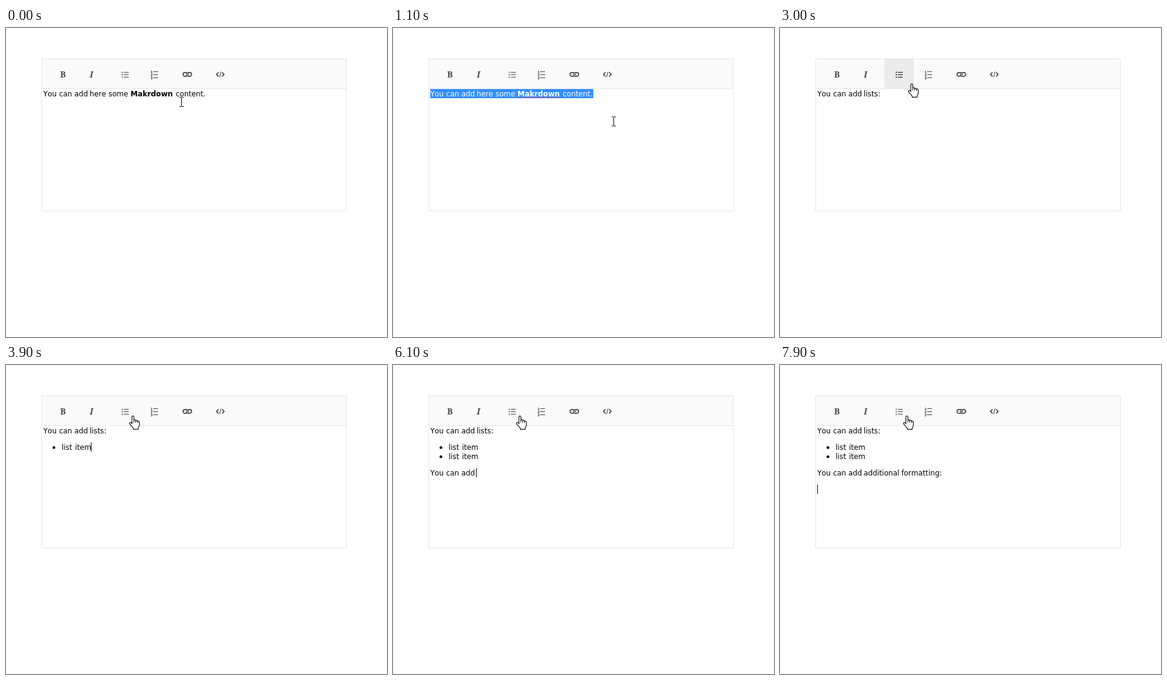
An HTML page with a canvas for the animation above (8 s loop, 624 by 506 pixels).

```html
<!DOCTYPE html>
<html lang="en">
<head>
<meta charset="utf-8">
<title>Rich text editor</title>
<style>
html, body { margin: 0; width: 100%; height: 100%; overflow: hidden; background: #fff; }
canvas { display: block; }
</style>
</head>
<body>
<canvas id="stage" width="624" height="506"></canvas>
<script>
const LOOP = 8000, TICK = 100, LINE = 15;
const c = document.getElementById('stage').getContext('2d');
const SANS = '11.8px "DejaVu Sans", Verdana, sans-serif';
const SERIF = '"Noto Serif", serif';

// y of each line, and where each of its words begins
const rows = {
  intro: { y: 100, xs: [61, 87, 112, 137, 168, 204, 278] },
  p1: { y: 100, xs: [61, 87, 112, 137] },
  li1: { y: 127, xs: [91, 113], bullet: true },
  li2: { y: 142, xs: [91, 113], bullet: true },
  li3: { y: 157, xs: [91], bullet: true },
  p2: { y: 169, xs: [61, 87, 112, 137, 198.7] },
  p3: { y: 196, xs: [61] },
  p4: { y: 223, xs: [61] },
  blank: { y: 127, xs: [61] }
};
const INTRO = 'You can add here some Makrdown content.';

const edits = [];
const edit = (t, row, text, caret = true) => edits.push({ t, row, text, caret });
function type(t, row, before, added, steps) {
  for (let i = 1; i <= steps; i++) {
    edit(t + (i - 1) * TICK, row, before + added.slice(0, Math.ceil(added.length * i / steps)));
  }
}

edit(0, 'intro', INTRO, false);
edit(500, 'intro', INTRO);
edit(900, 'intro', INTRO, false);
edit(1300, 'p1', '');
type(1500, 'p1', '', 'You ', 3);
type(1900, 'p1', 'You ', 'can add lists:', 6);
edit(2600, 'blank', '');
edit(2700, 'blank', '', false);
edit(3100, 'blank', '');
edit(3200, 'li1', '');
type(3400, 'li1', '', 'list ', 3);
type(3800, 'li1', 'list ', 'item', 2);
edit(4100, 'li2', '');
type(4300, 'li2', '', 'list item', 4);
edit(4800, 'li2', 'list item', false);
edit(5000, 'li3', '');
edit(5200, 'p2', '');
edit(5400, 'p2', '', false);
type(5600, 'p2', '', 'You can ', 3);
type(6000, 'p2', 'You can ', 'add ', 2);
type(6300, 'p2', 'You can add ', 'additional ', 4);
type(6800, 'p2', 'You can add additional ', 'formatting:', 7);
edit(7600, 'p3', '');
edit(7700, 'p4', '');
edit(7900, 'p3', '');

// time, x, y, pointing hand?
const moves = [
  [0, 287, 121], [100, 307, 130], [200, 339, 144], [300, 360, 152], [500, 361, 152],
  [700, 361, 153], [2900, 272, 118], [3000, 209, 90, true], [3100, 201, 82, true]
];

function rect(x, y, w, h, color) {
  c.fillStyle = color;
  c.fillRect(x, y, w, h);
}

function label(text, x, y, font, color) {
  c.font = font;
  c.fillStyle = color;
  c.fillText(text, x, y);
}

function trace(d, color, width) {
  c.strokeStyle = color;
  c.lineWidth = width;
  c.stroke(new Path2D(d));
}

function toolbar(shade) {
  const ink = '#444';
  rect(58, 50, 500, 250, '#e6e6e6');
  rect(59, 51, 498, 248, '#fff');
  rect(59, 51, 498, 48, '#fafafa');
  rect(58, 99, 500, 1, '#e6e6e6');
  if (shade) rect(171, 51, 48, 48, shade);

  label('B', 88.8, 81, 'bold 13.5px ' + SERIF, ink);
  label('I', 137.3, 81, 'italic bold 13.5px ' + SERIF, ink);
  for (let i = 0; i < 3; i++) {
    const y = 72 + i * 4, dark = shade ? '#000' : ink;
    rect(189.6, y - 0.3, 1.8, 1.7, dark);
    rect(193, y, 8, 1, dark);
    rect(241, 71 + i * 5, 8, 1, ink);
    label(i + 1, 236.6, 73.6 + i * 5, 'bold 5.5px "DejaVu Sans", sans-serif', ink);
  }
  c.lineCap = 'round';
  c.lineJoin = 'round';
  trace('M295 79.2H293.2A3.2 3.2 0 0 1 293.2 72.8H295.5A3.2 3.2 0 0 1 298.4 76.6', ink, 1.7);
  trace('M299 72.8H300.8A3.2 3.2 0 0 1 300.8 79.2H298.5A3.2 3.2 0 0 1 295.6 75.4', ink, 1.7);
  c.lineCap = 'butt';
  c.lineJoin = 'miter';
  trace('M348 72.6L344.8 76L348 79.4M354 72.6L357.2 76L354 79.4', '#333', 1.5);
  trace('M352.2 71.4L349.8 80.6', '#333', 1);
}

function words(name, text, color) {
  text.split(' ').forEach((word, i) => {
    const bold = word === 'Makrdown' ? 'bold ' : '';
    label(word, rows[name].xs[i], rows[name].y + 12, bold + SANS, color);
  });
}

function squiggle() {
  for (let x = 204; x < 273; x += 2) {
    rect(x, 113 + (x / 2) % 2, 1.5, 1, '#f0306a');
  }
}

function caret({ row, text }) {
  const { y, xs } = rows[row], parts = text.split(' ');
  const last = parts.length - 1, word = parts[last];
  c.font = SANS;
  let x = Math.floor(xs[last] + c.measureText(word).width);
  if (!word && last) x--;
  rect(row === 'intro' ? 327 : x, y, 1, LINE, '#000');
}

function page(t) {
  const done = edits.filter(e => e.t <= t), now = done[done.length - 1];
  if (now.row === 'intro') {
    const picked = t >= 1100;
    if (picked) rect(61, 100, 267, LINE, '#3390ff');
    words('intro', INTRO, picked ? '#fff' : '#000');
    if (t >= 200) squiggle();
  } else {
    const text = {};
    done.forEach(e => text[e.row] = e.text);
    delete text.intro;
    if (now.row !== 'li3') delete text.li3;
    for (const name in text) {
      words(name, text[name], '#000');
      if (!rows[name].bullet) continue;
      c.beginPath();
      c.arc(78.5, rows[name].y + 8.3, 2.2, 0, 7);
      c.fill();
    }
  }
  if (now.caret) caret(now);
}

const hand = new Path2D('M5 13V3Q5 1 6.6 1Q8.2 1 8.2 3V8.6Q8.4 7.2 9.8 7.4Q11.2 7.6 11.2 9' +
  'Q11.6 8 12.8 8.3Q14.2 8.6 14.2 10Q14.8 9.2 15.8 9.6Q17.2 10 17.2 11.6V15.5' +
  'Q17.2 18 15.8 19.8Q15 21 15 23H7.4Q7.2 21 5.8 19.4L1.4 14.6Q0.4 13 1.7 12Q3 11.2 5 13.6Z');

function pointer(t) {
  const [, x, y, pointing] = moves.filter(m => m[0] <= t).pop();
  if (pointing) {
    c.save();
    c.translate(x + 0.3, y + 0.3);
    c.fillStyle = '#fff';
    c.fill(hand);
    c.strokeStyle = '#111';
    c.lineWidth = 1.2;
    c.stroke(hand);
    c.lineWidth = 1;
    c.stroke(new Path2D('M8.2 8.5V12M11.2 9V12M14.2 10V12.5'));
    c.restore();
    return;
  }
  rect(x, y - 7, 1, 14, '#000');
  for (const end of [y - 8, y + 7]) {
    rect(x - 3, end, 3, 1, '#000');
    rect(x + 1, end, 3, 1, '#000');
  }
}

function shadeAt(t) {
  if (t >= 3000 && t < 3200) return '#ebebeb';
  if (t >= 5100 && t < 5200) return '#dadada';
  return '';
}

function draw(ms) {
  const t = Math.floor(ms % LOOP / TICK) * TICK;
  rect(0, 0, 624, 506, '#fff');
  toolbar(shadeAt(t));
  page(t);
  pointer(t);
}

c.fontKerning = 'none';
const start = performance.now();
function loop() {
  draw(performance.now() - start);
  requestAnimationFrame(loop);
}
loop();
</script>
</body>
</html>
```
